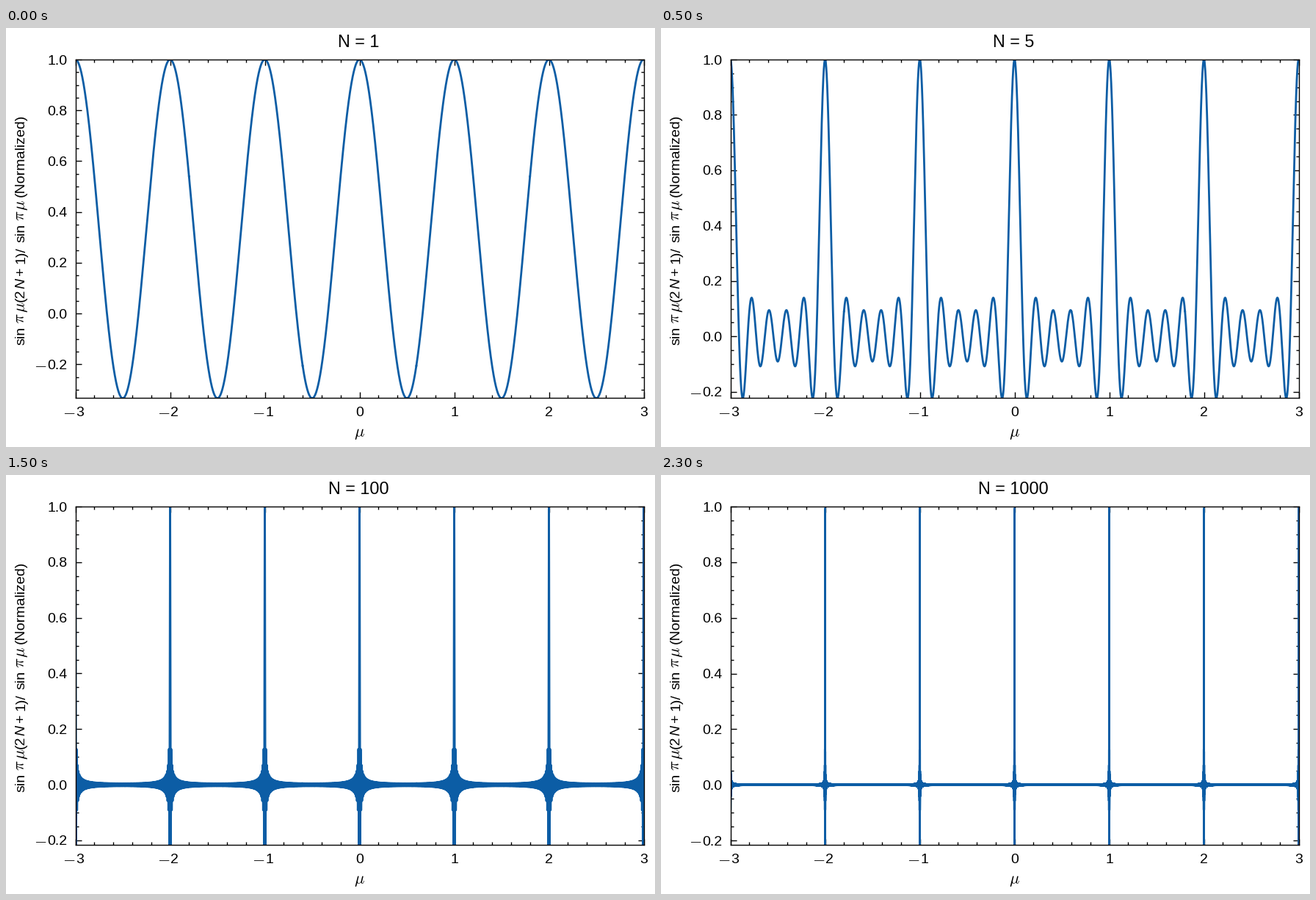
Recreate the animation shown at these times as a matplotlib script. Size 884 by 571 pixels, loop 2500 ms.

```python
import matplotlib.pyplot as plt
import numpy as np
from matplotlib.animation import FuncAnimation
from matplotlib.ticker import MultipleLocator

W, H, DPI = 884, 571, 100
LEFT, RIGHT, TOP, BOTTOM = 94.5, 868.5, 43, 504.5
ORDERS = [1, 5, 10, 100, 1000]
BODY, TITLE, SYMBOL = 14, 16.8, 16

plt.rcParams.update({
    "font.family": "Liberation Sans",
    "axes.linewidth": 1,
    "agg.path.chunksize": 20000,
})

fig = plt.figure(figsize=((W + 1e-4) / DPI, (H + 1e-4) / DPI), dpi=DPI,
                 facecolor="white")
ax = fig.add_axes([LEFT / W, 1 - BOTTOM / H,
                   (RIGHT - LEFT) / W, (BOTTOM - TOP) / H])


def put(x, y, s, size=BODY, **kw):
    """Place text with its baseline at pixel (x, y), y counted from the top."""
    kw.setdefault("va", "baseline")
    return fig.text(x / W, 1 - y / H, s, fontsize=size, color="black", **kw)


def symbol(x, y, name, **kw):
    return put(x, y, f"${name}$", SYMBOL, math_fontfamily="cm", **kw)


def kernel(mu, n):
    """sin(pi mu (2n+1)) / sin(pi mu), scaled to a peak of 1."""
    d = mu - np.round(mu)
    return np.sinc((2 * n + 1) * d) / np.sinc(d)


# Axes and ticks
ax.set_xlim(-3, 3)
for axis, major, minor in ((ax.xaxis, 1, 0.2), (ax.yaxis, 0.2, 0.05)):
    axis.set_major_locator(MultipleLocator(major))
    axis.set_minor_locator(MultipleLocator(minor))
ax.tick_params(which="both", direction="in", width=1, top=True, right=True,
               labelbottom=False, labelleft=False)
ax.tick_params(which="major", length=6)
ax.tick_params(which="minor", length=3)

# Labels along x
for k in range(-3, 4):
    x = LEFT + (k + 3) * (RIGHT - LEFT) / 6
    if k < 0:
        symbol(x - 8.5, 529, "-", ha="center")
        x += 6.3
    put(x, 529, str(abs(k)), ha="center")
symbol(481, 556, r"\mu", ha="center")

# Labels along y, moved whenever the limits change
y_labels = []
for k in range(-1, 6):
    value = k / 5
    parts = [put(83.5, 0, f"{abs(value):.1f}", ha="right")]
    if k < 0:
        parts.append(symbol(47, 0, "-", ha="center"))
    y_labels.append((value, parts))

# Axis title, running upwards
side = dict(rotation=90, rotation_mode="anchor", ha="left")
for y, s in ((431.5, "sin"), (372.5, "(2"), (336.7, "+"), (321, "1)/"),
             (292, "sin"), (230, "(Normalized)")):
    put(25, y, s, **side)
put(25, 355, "N", style="italic", **side)
for y, s in ((402.5, r"\pi"), (388, r"\mu"), (263, r"\pi"), (248.5, r"\mu")):
    symbol(25, y, s, **side)

title = put(480, 26, "", TITLE, ha="center")
mu = np.linspace(-3, 3, 100000)
curve, = ax.plot([], [], color="#0C5DA5", lw=2)


def update(i):
    n = ORDERS[i]
    y = kernel(mu, n)
    low, high = y.min(), y.max()
    curve.set_data(mu, y)
    ax.set_ylim(low, high)
    title.set_text(f"N = {n}")
    for value, parts in y_labels:
        py = TOP + (high - value) / (high - low) * (BOTTOM - TOP) + 6.5
        for part in parts:
            part.set_y(1 - py / H)
    return [curve, title]


anim = FuncAnimation(fig, update, frames=len(ORDERS), interval=500,
                     init_func=lambda: [curve, title], repeat=True,
                     repeat_delay=0, blit=False)
plt.show()
```
